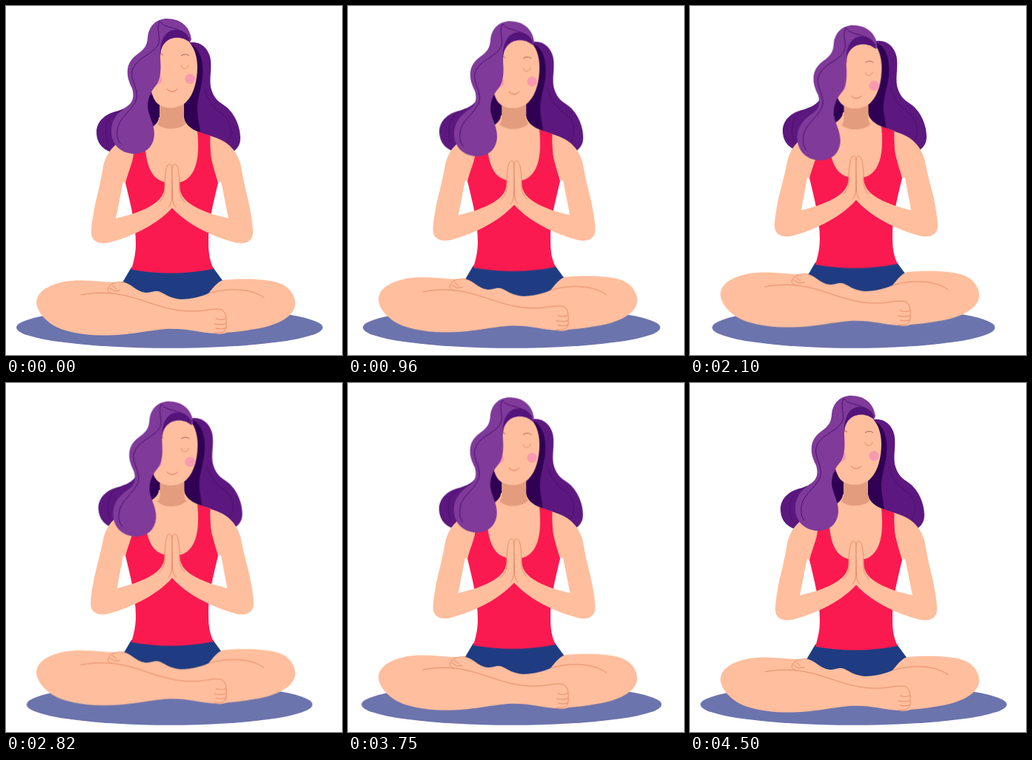
An HTML page without scripts for the animation above (4530 ms loop, 453 by 470 pixels).

```html
<!DOCTYPE html>
<html lang="en">
<head>
<meta charset="utf-8">
<title>Breathing meditation</title>
<style>
  html, body { margin: 0; width: 100%; height: 100%; overflow: hidden; background: #fff; }
  svg { display: block; width: 100%; height: 100%; }

  .breathe { animation: drift 2.265s cubic-bezier(.37, 0, .63, 1) infinite alternate; }
  @keyframes drift { to { transform: translate(var(--x, 0px), var(--y, 0px)) scaleX(var(--sx, 1)); } }

  .shadow { --sx: .923; transform-origin: 220.5px 433px; fill: #6c74ad; }
  .back-hair { --x: 3px; --y: -2px; fill: #5c187f; }
  .torso { --y: -6.8px; }
  .legs, .hand { --y: -11px; }
  .head { --x: .5px; --y: 1px; }
  .features { --x: -.3px; --y: 8.3px; }
  .front-hair { --x: 2.7px; --y: 9px; fill: #7f3a9a; }

  /* Both arms share one outline; the right one is mirrored. */
  .arm {
    d: path("M172 175C147 182 136 196 131 216C128 236 123 255 120 268C117 284 115 296 115 305C115 317 125 321 137 319C162 313 200 298 224 272L224 222C224 213 222 212 220 213C216 214 215 224 214 240C214 258 204 268 171 280L148 286C152 268 155 250 158 237L161 238C165 222 171 212 172 198Z");
    animation-name: lift;
  }
  @keyframes lift {
    to { d: path("M172 169C147 176 136 190 131 210C127 230 122 248 119 260C116 276 114 288 114 296C114 308 124 312 136 310C162 303 200 288 224 261L224 211C224 202 222 201 220 202C216 203 215 213 214 229C214 247 204 257 171 269L150 275C153 258 156 244 158 231L161 232C165 216 171 206 172 192Z"); }
  }
  .hand { d: path("M207 264C216 255 214 247 214 238C215 223 216 214 220 213C224 212 224 219 224 226L223.5 258C223.5 264 222 268 219 271"); }

  .skin { fill: #ffbe9d; }
  .shade { fill: #e39d7e; }
  .deep { fill: #2f0053; }
  .dark { fill: #54147a; }
  .line { fill: none; stroke: #e58e6c; stroke-width: 1; stroke-linecap: round; }
  .strand { fill: none; stroke: #4d1170; stroke-width: 1; stroke-linecap: round; }
  .blush { fill: #f79ab0; }
</style>
</head>
<body>
<svg viewBox="0 0 453 470">
  <ellipse class="breathe shadow" cx="220.5" cy="433" rx="206.5" ry="27.7"/>

  <g class="breathe back-hair">
    <path d="M240 51C258 44 272 54 275.5 70C278 84 274 96 276 109C279 122 285 128 293 133C306 141 316 160 316 178C316 190 308 199 295 198L240 190L182 180L180 120Z"/>
    <path d="M178 118C172 132 162 138 152 141C136 144 122 154 122 170C122 186 133 197 150 198L185 190Z"/>
    <path class="deep" d="M245 50C262 55 267 75 265 96C263 112 257 128 258 142C259 154 262 164 262 174L182 180L182 120L240 120Z"/>
    <path class="strand" d="M268 112C272 130 282 139 292 146C305 156 306 172 299 184"/>
    <path class="strand" d="M158 139C138 146 130 160 137 184"/>
  </g>

  <g class="breathe torso">
    <path class="skin" d="M206 150C206 161 190 168 172 175L161 238L186 300L262 300L286 238L276 175C258 170 242 164 240 150Z"/>
    <path fill="#1f3c82" d="M169 352L156 374L170 400L275 400L293 371L279 352Z"/>
    <path fill="#fa1a50" d="M172 175C173 205 165 222 161 238C168 268 175 293 175 320C175 334 172 345 169 355Q224 365 280 354C275 344 273 334 273 319C272 293 279 268 286 238C282 224 274 205 275.5 175L258 169C261 197 259 230 236 237L213 237C191 231 187 203 187 170Z"/>
  </g>

  <g class="breathe legs">
    <path class="skin" d="M41 399C42 379 72 369 102 369.5C124 370 142 373 158 372C170 374 174 384 188 386C197 386 201 382 208 385C216 389 223 394 236 395C250 395 264 391 273 387C279 380 284 372 293 369C318 367 350 367 368 373C382 378 390 389 390 402C388 419 366 429 342 434C325 437 311 439 297 440C292 442 287 442 281 441C262 440 240 433 215 435C190 437 165 444 128 443.5C103 443 78 439 62 429C50 421 41 409 41 399Z"/>
    <g class="line">
      <path d="M101 389C127 384 150 386 176 394C207 404 227 412 254 411C270 411 279 406 291 409C298 413 297 423 297 432C296 440 289 441 281 440"/>
      <path d="M273 387C298 379 332 380 348 393"/>
      <path d="M160 372C152 371 142 372 139 378C136 382 137 386 143 387M140 380L147 384L154 383M143 376L149 381M283 421Q290 424 296 421M281 428Q290 430 296 428M283 434Q290 436 296 434"/>
    </g>
  </g>

  <g>
    <path class="breathe arm skin"/>
    <path class="breathe hand line"/>
  </g>
  <g transform="translate(448) scale(-1 1)">
    <path class="breathe arm skin"/>
    <path class="breathe hand line"/>
  </g>

  <g class="breathe head">
    <path class="shade" d="M207 125V150C207 154 206 156 204 159C213 168 234 167 243 158C241 156 240 153 240 150V125Z"/>
    <path class="skin" d="M193 70C196 48 211 40 228 40C247 41 258 59 258 82C258 101 253 119 244 128C235 139 214 140 204 131C196 123 192 105 193 70Z"/>
    <g class="breathe features">
      <circle class="blush" cx="248" cy="98.3" r="6.7"/>
      <circle class="blush" cx="203.5" cy="99" r="6.7"/>
      <path class="line" d="M236 80C237 86 244 86 246 80"/>
      <path d="M236 67Q242 63 247 67M205 65Q209 63 212 66" fill="none" stroke="#a8645f"/>
      <path d="M217 112Q224 119 231 112" fill="none" stroke="#e0736a" stroke-linecap="round"/>
    </g>
  </g>

  <g class="breathe front-hair">
    <path d="M217 17C236 17 248 28 250 45L248 49C240 42 230 41 222 44C211 49 208 58 208 70C209 85 209 97 203 106C195 115 191 124 191 136C192 148 200 158 200 173C199 190 188 199 172 199C153 198 142 185 142 169C142 152 152 143 162 136C172 130 173 121 170 111C165 101 163 94 164 85C165 78 168 72 177 65C187 58 190 53 191 43C192 26 204 17 217 17Z"/>
    <path class="dark" d="M208 68C207 49 213 33 228 32C240 32 247 39 248 49C240 42 230 41 222 44C211 49 208 58 208 68Z"/>
    <path class="strand" d="M207 21C201 34 211 42 204 54C196 66 175 70 170 87C167 101 181 114 175 128C168 143 151 151 150 168C149 176 151 181 154 185"/>
    <path class="strand" d="M208 21C214 32 233 25 248 44"/>
  </g>
</svg>
</body>
</html>
```
